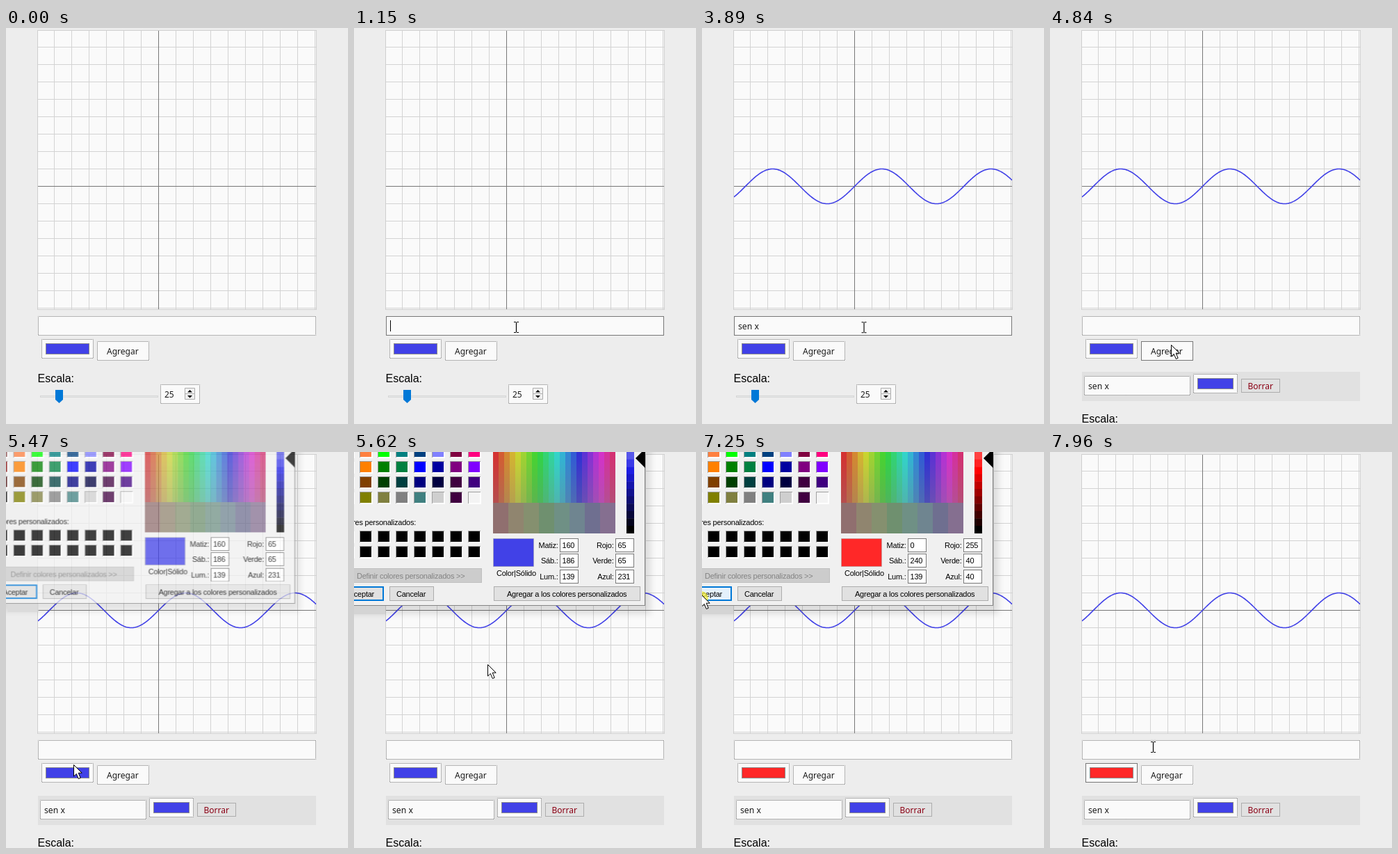
An HTML page that plays this animation: 492 px wide and 569 px high, repeating every 8000 ms.

```html
<!DOCTYPE html>
<html lang="es">
<head>
<meta charset="utf-8">
<title>Graficador</title>
<style>
html, body { margin: 0; width: 100%; height: 100%; overflow: hidden; background: #ededed; }
svg { display: block; }
text { font: 12px "Noto Sans", sans-serif; fill: #1a1a1a; }
.label { font: 16px "Liberation Sans", Arial, sans-serif; fill: #000; }
.typed { font-size: 12.2px; }
.box { fill: #fafafa; stroke: #777; }
.dot { stroke-dasharray: 1 1; stroke-dashoffset: .5; }
.line { fill: none; stroke: #777; }
.chip { stroke: #8c8c8c; }
.blue { fill: #4141e7; }
#dialog text { font: 11px "Liberation Sans", Arial, sans-serif; letter-spacing: -.24px; fill: #000; }
#dialog .off { fill: #838383; }
.btn { fill: #e1e1e1; stroke: #adadad; }
.field { fill: #fff; stroke: #7a7a7a; }
.end { text-anchor: end; }

/* 1% = 80 ms */
#pointer, #arrow, #beam, #click, #solid, #cover, #caret, #curve, #hot, #focus, #row,
#scale, #dialog, #ok, .page, .pick, .was, .now { animation: 8s step-end infinite; }
#pointer { animation-name: travel; animation-timing-function: linear; }
#arrow { animation-name: arrow; }
#beam { animation-name: beam; }
#click { animation-name: click; }
#solid { animation-name: solid; }
#cover { animation-name: type; }
#caret { animation-name: blink; }
#curve { animation-name: curve; }
#hot { animation-name: hot; }
#focus { animation-name: focus; }
#row { animation-name: row; }
#scale { animation-name: push; }
#dialog { animation-name: dialog; transform-origin: 189px 0; }
#ok { animation-name: ok; }
.page { animation-name: recolor; }
.pick { animation-name: pick; }
.was { animation-name: was; }
.now { animation-name: now; }

@keyframes travel {
  0%, 1.6% { transform: translate(510px, 600px); }
  1.625% { transform: translate(402px, 552px); }
  4% { transform: translate(345px, 512px); }
  8% { transform: translate(255px, 447px); }
  11.25%, 48.6% { transform: translate(233px, 430px); }
  51% { transform: translate(205px, 446px); }
  54.5%, 58.5% { transform: translate(172px, 459px); }
  60.4%, 61.3% { transform: translate(174px, 455px); }
  63.2% { transform: translate(132px, 470px); }
  65%, 69.2% { transform: translate(97px, 449px); }
  69.25%, 70% { transform: translate(104px, 410px); }
  70.2%, 71.1% { transform: translate(192px, 305px); }
  73% { transform: translate(212px, 110px); }
  75%, 81.8% { transform: translate(201px, -24px); }
  84% { transform: translate(130px, 70px); }
  88.5%, 92.5% { transform: translate(-1px, 205px); }
  95% { transform: translate(60px, 300px); }
  98% { transform: translate(136px, 405px); }
  99.4%, 100% { transform: translate(148px, 424px); }
}
@keyframes arrow { 0% { opacity: 1 } 9% { opacity: 0 } 50.3% { opacity: 1 } 98.5%, 100% { opacity: 0 } }
@keyframes beam { 0% { opacity: 0 } 9% { opacity: 1 } 50.3% { opacity: 0 } 98.5%, 100% { opacity: 1 } }
@keyframes click {
  0% { opacity: 0 } 12.25% { opacity: .7 } 14.3% { opacity: 0 }
  55.2% { opacity: .7 } 56.2% { opacity: 0 } 65.4% { opacity: .7 } 66.6% { opacity: 0 }
  89.5% { opacity: .7 } 91.6%, 100% { opacity: 0 }
}
@keyframes solid {
  0% { opacity: 0; stroke: #777 } 12.25% { opacity: 1; stroke: #777 }
  26.25% { opacity: 1; stroke: #e00000 } 38.875% { opacity: 1; stroke: #777 }
  55.2%, 100% { opacity: 0; stroke: #777 }
}
@keyframes type {
  0% { transform: none } 26.25% { transform: translateX(6px) } 29.1% { transform: translateX(13px) }
  31% { transform: translateX(20px) } 33.25% { transform: translateX(24px) }
  38.875% { transform: translateX(30px) } 56.2%, 100% { transform: none }
}
@keyframes blink {
  0% { opacity: 0 } 12.25% { opacity: 1 } 19.375% { opacity: 0 } 26.25% { opacity: 1 }
  45.875% { opacity: 0 } 52.5% { opacity: 1 } 55.2%, 100% { opacity: 0 }
}
@keyframes curve { 0% { opacity: 0 } 39.8%, 100% { opacity: 1 } }
@keyframes hot { 0% { opacity: 0 } 54% { opacity: 1 } 65.4%, 100% { opacity: 0 } }
@keyframes focus { 0% { opacity: 0 } 91.625%, 100% { opacity: 1 } }
@keyframes row { 0% { opacity: 0 } 56.2%, 100% { opacity: 1 } }
@keyframes push { 0% { transform: none } 56.2%, 100% { transform: translateY(58px) } }
@keyframes dialog {
  0% { opacity: 0; transform: scale(.97) }
  67.4% { opacity: .35; transform: scale(.97) }
  68.3% { opacity: .75; transform: scale(.9865) }
  69.2% { opacity: 1; transform: none }
  91.625% { opacity: .6; transform: scale(.9865) }
  92.6% { opacity: .2; transform: scale(.97) }
  93.6%, 100% { opacity: 0; transform: scale(.97) }
}
@keyframes ok { 0% { fill: #e1e1e1 } 87.8%, 100% { fill: #e5f1fb } }
@keyframes recolor { 0% { fill: #4141e7 } 90.5%, 100% { fill: #ff2828 } }
@keyframes pick { 0% { fill: #4141e7 } 76.5%, 100% { fill: #ff2828 } }
@keyframes was { 0% { opacity: 1 } 76.5%, 100% { opacity: 0 } }
@keyframes now { 0% { opacity: 0 } 76.5%, 100% { opacity: 1 } }
</style>
</head>
<body>
<svg width="492" height="569" viewBox="0 0 492 569">
  <defs>
    <pattern id="grid" x="69" y="27" width="25" height="25" patternUnits="userSpaceOnUse">
      <path d="M.5 0V25M0 .5H25" stroke="#d3d3d3"/>
    </pattern>
    <linearGradient id="gray" x2="0" y2="1">
      <stop stop-color="#808080" stop-opacity="0"/>
      <stop offset="1" stop-color="#808080" stop-opacity=".38"/>
    </linearGradient>
    <filter id="soft" x="-5%" y="-10%" width="110%" height="120%"><feGaussianBlur stdDeviation="5"/></filter>
    <clipPath id="plot"><rect x="46" y="4" width="400" height="400"/></clipPath>
  </defs>

  <rect x="45.5" y="3.5" width="401" height="401" fill="#fafafa" stroke="#cfcfcf"/>
  <rect x="46" y="4" width="400" height="400" fill="url(#grid)"/>
  <path d="M219.5 4V404M46 227.5H446" stroke="#777"/>
  <path id="curve" fill="none" stroke="#4141e7" stroke-width="1.6" clip-path="url(#plot)"/>

  <rect class="box dot" x="46.5" y="414.5" width="399" height="27"/>
  <rect id="solid" class="line" x="46.5" y="414.5" width="399" height="27"/>
  <text class="typed" x="52" y="433">sen x</text>
  <g id="cover">
    <rect x="52" y="418" width="36" height="20" fill="#fafafa"/>
    <rect id="caret" x="52" y="420" width="1" height="16"/>
  </g>

  <rect class="box dot" x="51.5" y="447.5" width="74" height="27"/>
  <rect id="focus" class="line" x="51.5" y="447.5" width="74" height="27"/>
  <rect class="chip page" x="57.5" y="453.5" width="62" height="15"/>
  <rect class="box dot" x="131.5" y="450.5" width="74" height="27"/>
  <rect id="hot" class="line" x="131.5" y="450.5" width="74" height="27"/>
  <text x="145" y="469">Agregar</text>

  <g id="row">
    <rect x="46" y="494" width="400" height="42" fill="#e1e1e1"/>
    <rect class="box dot" x="49.5" y="500.5" width="152" height="27"/>
    <text class="typed" x="55" y="519">sen x</text>
    <rect class="box dot" x="206.5" y="497.5" width="63" height="27"/>
    <rect class="chip blue" x="212.5" y="503.5" width="51" height="15"/>
    <rect class="btn" x="275.5" y="504.5" width="55" height="19"/>
    <text x="284.5" y="519" style="fill:#8b0014">Borrar</text>
  </g>

  <g id="scale">
    <text class="label" x="45.5" y="509">Escala:</text>
    <rect x="49.5" y="528.5" width="169" height="2" fill="#e7eaea" stroke="#d6d6d6"/>
    <path d="M71 520H82V534L76.5 539L71 534Z" fill="#0078d7"/>
    <rect class="box dot" x="222.5" y="512.5" width="56" height="27"/>
    <text x="228" y="531">25</text>
    <path d="M257.5 517.5H271.5V525.5H257.5ZV533.5H271.5V525.5" fill="#f0f0f0" stroke="#adadad"/>
    <path d="M261 523.5H268L264.5 520ZM261 528H268L264.5 531.5Z"/>
  </g>

  <g id="dialog">
    <rect x="-300" y="-300" width="727" height="533" opacity=".11" filter="url(#soft)"/>
    <rect y="221" width="45" height="12" fill="#d4d4d4"/>
    <rect x="-300.5" y="-300.5" width="719" height="521" fill="#f0f0f0" stroke="#858585"/>
    <g id="cells"></g>
    <text class="end" x="89" y="105">Colores personalizados:</text>
    <rect x="-100.5" y="167.5" width="284" height="20" fill="#ccc" stroke="#bfbfbf"/>
    <text class="off" x="4" y="182">Definir colores personalizados &gt;&gt;</text>
    <rect id="ok" x="-30" y="194" width="72" height="19" stroke="#0078d7" stroke-width="2"/>
    <text class="end" x="29" y="208">Aceptar</text>
    <rect class="btn" x="51.5" y="193.5" width="63" height="20"/>
    <text x="61" y="208">Cancelar</text>
    <rect class="btn" x="201.5" y="193.5" width="210" height="20"/>
    <text x="220" y="208">Agregar a los colores personalizados</text>
    <g id="hues"></g>
    <rect x="200" y="0" width="176" height="73" fill="url(#gray)"/>
    <g id="blues" class="was"></g>
    <g id="reds" class="now"></g>
    <path d="M405 9L419 -5V23Z"/>
    <rect class="pick" x="200.5" y="124.5" width="58" height="40" stroke="#a0a0a0" stroke-opacity=".5"/>
    <text x="205" y="178">Color|Sólido</text>
    <g id="fields"></g>
    <g id="before" class="was"></g>
    <g id="after" class="now"></g>
  </g>

  <g id="pointer">
    <circle id="click" cy="5" r="10" fill="#f5ee30"/>
    <path id="arrow" d="M.5 .5V17L4.3 13.4L7.3 20.5L10.2 19.3L7.2 12.2H12.2Z" fill="#fff" stroke="#000"/>
    <path id="beam" d="M-3 -7.5H0M1 -7.5H4M.5 -7V7M-3 7.5H0M1 7.5H4" fill="none" stroke="#000" stroke-width="1.2"/>
  </g>
</svg>
<script>
const fill = (id, parts) => { document.getElementById(id).innerHTML = parts.join(''); };
const range = n => [...Array(n).keys()];
const rect = (x, y, w, h, color, extra = '') =>
  `<rect x="${x}" y="${y}" width="${w}" height="${h}" fill="${color}" ${extra}/>`;

// Sine curve: 25 px per unit, centred on the axes
const points = range(401).map(i => {
  const x = 46 + i;
  return `${x} ${(227.5 - 25 * Math.sin((x - 219.5) / 25)).toFixed(2)}`;
});
document.getElementById('curve').setAttribute('d', 'M' + points.join('L'));

// Sunken colour cells, 26 x 22 px apart
const cell = (col, y, color) => {
  const x = 9 + 26 * (col - 1);
  return rect(x - 1, y - 1, 18, 17, '#a0a0a0') + rect(x, y, 18, 17, '#fff') + rect(x, y, 16, 15, color);
};
const basic = [
  '804040 ff8040 00ff00 008080 004080 8080ff 800040 ff0080',
  '800000 ff8000 008000 008040 0000ff 0000a0 800080 8000ff',
  '400000 804000 004000 004040 000080 000040 400040 400080',
  '000000 808000 808040 808080 408080 cfcfcf 400040 f4f4f4'
];
fill('cells', [
  ...basic.flatMap((line, r) => line.split(' ').map((c, i) => cell(i, 22 * r - 8, '#' + c))),
  ...range(16).map(i => cell(i % 8, i < 8 ? 114 : 136, '#000'))
]);

fill('hues', [
  ...range(22).map(i => rect(200 + 8 * i, 0, 8, 73, `hsl(${i * 16},66%,51%)`, 'shape-rendering="crispEdges"')),
  ...range(8).map(i => rect(200 + 22 * i, 73, 22, 44, `hsl(${i * 40},13%,50%)`))
]);

const shades = (hue, sat) => range(11).map(i =>
  rect(392, i * 10.6, 11, 11, `hsl(${hue},${sat}%,${Math.max(0, 63 - 6.3 * i)}%)`));
fill('blues', shades(240, 78));
fill('reds', shades(0, 100));

const labels = ['Matiz:', 'Sáb.:', 'Lum.:', 'Rojo:', 'Verde:', 'Azul:'];
const place = i => [i < 3 ? 296 : 376, 124 + 22.5 * (i % 3) | 0];
const values = list => list.map((v, i) => {
  const [x, y] = place(i);
  return `<text x="${x + 3.5}" y="${y + 14}">${v}</text>`;
});
fill('fields', labels.map((name, i) => {
  const [x, y] = place(i);
  return `<text class="end" x="${x - 2.5}" y="${y + 14}">${name}</text>` +
    `<rect class="field" x="${x + .5}" y="${y + .5}" width="26" height="19"/>`;
}));
fill('before', values([160, 186, 139, 65, 65, 231]));
fill('after', values([0, 240, 139, 255, 40, 40]));
</script>
</body>
</html>
```
